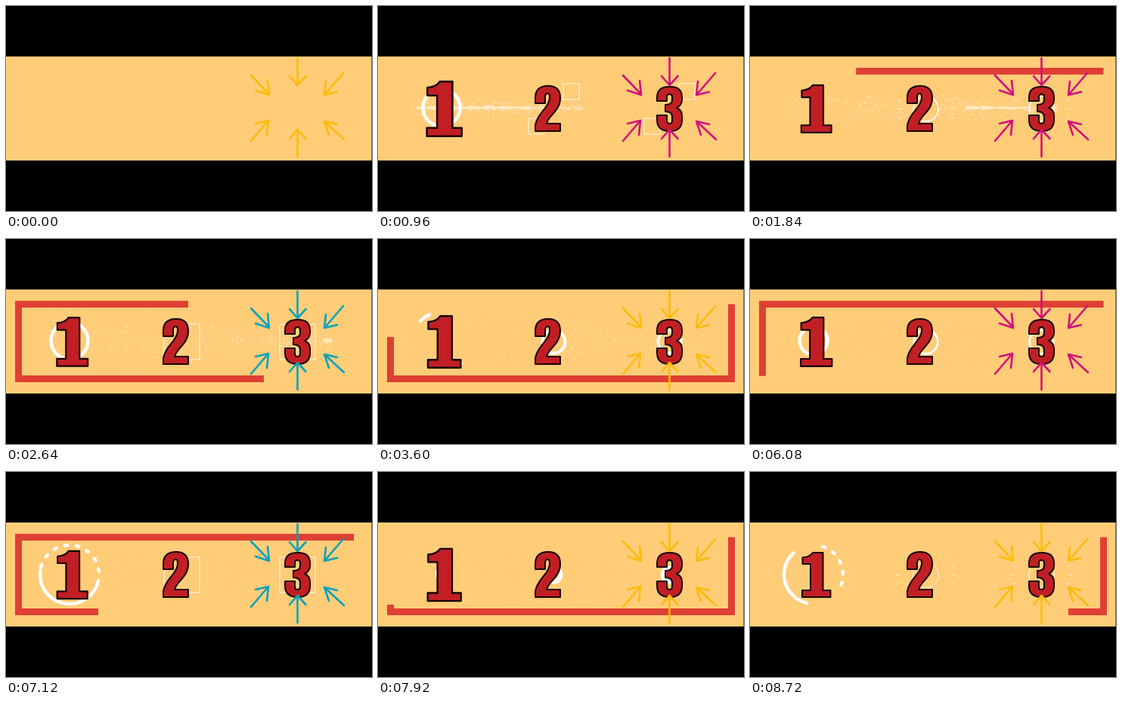
An HTML page with a canvas for the animation above (8800 ms loop, 484x272 px).

```html
<!DOCTYPE html>
<html lang="en">
<head>
<meta charset="utf-8">
<title>1 2 3</title>
<style>
  html, body { margin: 0; width: 100%; height: 100%; overflow: hidden; background: #000; }
  canvas { display: block; width: 484px; height: 272px; }
</style>
</head>
<body>
<canvas id="stage" width="484" height="272"></canvas>
<script>
const ctx = document.getElementById('stage').getContext('2d');
const STEP = 80, STEPS = 110;
const RAD = Math.PI / 180;

const DIGITS = {
  one: new Path2D('M83 107H96.5V157H106.5V166H69V157H80V122H69.5V113.5Q79 113 83 107Z'),
  two: new Path2D('M208 129V122Q208 106 225 106Q241 106 241 122C241 134 234 140 228 147' +
    'Q224 152 223 156H241V166H208V158C210 147 217 141 222 134Q227 127 227 121' +
    'Q227 116 224.5 116Q221 116 221 121V129Z'),
  three: new Path2D('M369 126V121Q369 107 386 107Q402 107 402 121V124Q402 132 395 135' +
    'Q402 138 402 146V151Q402 166 386 166Q369 166 369 151V145H382V152Q382 156 385.5 156' +
    'Q389 156 389 152V147Q389 140 380 140V131Q389 131 389 125V121Q389 117 385.5 117' +
    'Q382 117 382 121V126Z')
};

const ARROWS = new Path2D(
  'M385.5 69V104M375 93L385.5 105L396.5 93' +
  'M385.5 200V164M375 176L385.5 164L396.5 176' +
  'M324 92L348 117M330 112L348 118L346 99' +
  'M446 89L421 118M438 114L421 118L423 100' +
  'M324 179L347 152M330 156L347 152L345 171' +
  'M447 177L421 153M438 157L421 153L427 171');
const ARROW_COLORS = ['#fdbc08', '#d5107c', '#08a3bc'];

// Border track, clockwise from the top right corner
const TRACK = { left: 16.5, top: 86.5, right: 467.5, bottom: 185.5, length: 1100 };
const DASH = 648;

// Key poses: [phase, value]
const BORDER_LEAD = [[-1, 0], [0.2, 145.5], [4.2, 605.5], [5.8, 873.5], [7.4, 1092.5], [8.6, 1311], [12.6, 1860]];
const PULSE = [[0, 1], [3, 1.17], [5.5, 1.09], [8, 1.04], [9, 1.04], [12, 1.23], [17.5, 1.16], [26.5, 1], [27.5, 1]];

const clamp = (v, lo = 0, hi = 1) => Math.max(lo, Math.min(hi, v));

function keyed(keys, x) {
  for (let k = 1; k < keys.length; k++) {
    const [x0, y0] = keys[k - 1], [x1, y1] = keys[k];
    if (x <= x1) return y0 + (y1 - y0) * clamp((x - x0) / (x1 - x0));
  }
  return keys[keys.length - 1][1];
}

function randomSource(seed) {
  return () => {
    seed = (seed * 1664525 + 1013904223) >>> 0;
    return seed / 4294967296;
  };
}

const rnd = randomSource(71);
const grains = Array.from({ length: 1100 }, () => ({
  along: rnd(),
  spread: rnd() + rnd() + rnd() - 1.5,
  drift: rnd() - 0.5,
  size: 0.6 + rnd() * 0.8,
  life: 35 + 70 * rnd()
}));

function line(color, width, cap = 'butt') {
  ctx.strokeStyle = color;
  ctx.lineWidth = width;
  ctx.lineCap = cap;
  ctx.lineJoin = cap === 'round' ? 'round' : 'miter';
}

function arc(x, y, r, from, to) {
  ctx.beginPath();
  ctx.arc(x, y, r, from * RAD, to * RAD);
  ctx.stroke();
}

function drawBrush(step) {
  if (step < 3) return;
  const travel = at => 1 - (1 - clamp((at - 2) / 28)) ** 2;
  const head = travel(step);
  for (const g of grains) {
    if (g.along > head) continue;
    const age = step - 2 - 28 * (1 - Math.sqrt(1 - g.along));
    if (age > g.life) continue;
    const open = clamp(age / 26);
    const x = 45 + 385 * g.along + g.drift * 24 * open;
    const y = 135 + g.spread * (5 + 32 * open);
    ctx.globalAlpha = 0.8 - 0.5 * clamp(age / 50);
    ctx.fillStyle = age > 36 ? '#f0b75d' : '#fff6e3';
    ctx.fillRect(x, y, g.size, g.size);
  }
  // Wet stroke near the moving tip
  const tip = 45 + 385 * head;
  const fade = clamp((42 - step) / 12);
  const tail = Math.max(45, tip - (step < 14 ? 220 : 220 - (step - 14) * 11));
  ctx.globalAlpha = 0.75 * fade;
  ctx.fillStyle = '#fff3da';
  const wide = step > 24 ? 4 : 2.6;
  for (let x = tail; x < tip; x += 2) {
    const taper = step > 24 ? 1 : clamp((tip - x) / 110, 0.2, 1);
    const half = wide * taper * (0.75 + 0.3 * Math.sin(x * 0.43) * Math.sin(x * 0.17));
    ctx.fillRect(x, 135 - half, 2, half * 2);
  }
  ctx.globalAlpha = 1;
}

function drawBorder(step) {
  if (step < 1) return;
  let phase = step % 13.6;
  if (phase > 12.6) phase -= 13.6;
  const lead = keyed(BORDER_LEAD, phase);
  const from = Math.max(0, lead - DASH), to = Math.min(TRACK.length, lead);
  if (to <= from) return;
  const { left, top, right, bottom, length } = TRACK;
  line('#df4034', 9);
  ctx.setLineDash([to - from, length * 2]);
  ctx.lineDashOffset = -from;
  ctx.beginPath();
  ctx.moveTo(right, top);
  ctx.lineTo(right, bottom);
  ctx.lineTo(left, bottom);
  ctx.lineTo(left, top);
  ctx.lineTo(right, top);
  ctx.stroke();
  ctx.setLineDash([]);
}

function drawRing(step) {
  const phase = step % 21;
  if (phase < 3 || phase > 15) return;
  const x = 84, y = 136;
  line('#fff', 4.5, 'round');
  if (phase >= 8) {
    const r = phase < 12 ? 39 - (phase - 8) * 3.6 : 24.5 - (phase - 12) * 6;
    arc(x, y - 1, r, 0, 360);
    return;
  }
  const turn = phase - 3;
  const middle = 235 - 70 * turn + 5 * turn * (turn - 1) / 2;
  const half = keyed([[0, 11], [1, 62], [2, 88], [4, 150]], turn);
  arc(x, y, 39, middle - half, middle + half);
  const dashHalf = Math.min(keyed([[0, 2], [1, 52], [2, 80]], turn), 176 - half);
  const center = middle + 175;
  for (let a = -dashHalf; a <= dashHalf; a += 22) arc(x, y, 39, center + a, center + a + 5);
}

function drawSparkle(step, x, y) {
  const phase = step % 28;
  const square = (dx, dy, half) => ctx.strokeRect(x + dx - half, y + dy - half, half * 2, half * 2);
  line('rgba(255,255,255,.85)', 1);
  if (phase > 0 && phase <= 14) {
    if (phase <= 8) square(0, 0, Math.min(23.5, phase * 4.7));
    if (phase > 5) {
      const away = (phase - 5) * 3.3, half = 23.5 - (phase - 5) * 1.86;
      square(away, -away, half);
      square(-away, away, half);
    }
  } else if (phase > 14) {
    line('#fff', keyed([[15, 6], [17, 4], [25, 0.8]], phase));
    arc(x, y, keyed([[15, 9], [17, 15], [25, 17]], phase), 0, 360);
    if (phase < 21) return;
    line('rgba(255,255,255,.75)', 1);
    const reach = 33 + (phase - 21) * 0.7;
    for (const a of [-18, 0, 18, 162, 180, 198]) {
      const c = Math.cos(a * RAD), s = Math.sin(a * RAD);
      ctx.beginPath();
      ctx.moveTo(x + c * reach, y + s * reach);
      ctx.lineTo(x + c * (reach + 4), y + s * (reach + 4));
      ctx.stroke();
    }
  }
}

function drawDigit(path, scale = 1) {
  ctx.save();
  ctx.translate(88, 136.5);
  ctx.scale(scale, scale);
  ctx.translate(-88, -136.5);
  ctx.fillStyle = '#c11f24';
  ctx.fill(path);
  line('#150406', 2, 'round');
  ctx.stroke(path);
  ctx.restore();
}

function draw(step) {
  ctx.fillStyle = '#000';
  ctx.fillRect(0, 0, 484, 272);
  ctx.fillStyle = '#ffcc78';
  ctx.fillRect(0, 67, 483.5, 138);
  drawBrush(step);
  drawBorder(step);
  drawRing(step);
  drawSparkle(step, 232.5, 136.5);
  drawSparkle(step, 385.5, 136.5);
  if (step > 0) {
    drawDigit(DIGITS.one, keyed(PULSE, step % 27.5));
    drawDigit(DIGITS.two);
    drawDigit(DIGITS.three);
  }
  line(ARROW_COLORS[Math.floor(step / 3) % 3], 2.6, 'round');
  ctx.stroke(ARROWS);
}

const start = performance.now();
function tick() {
  draw(Math.floor((performance.now() - start) / STEP) % STEPS);
  requestAnimationFrame(tick);
}
tick();
</script>
</body>
</html>
```
